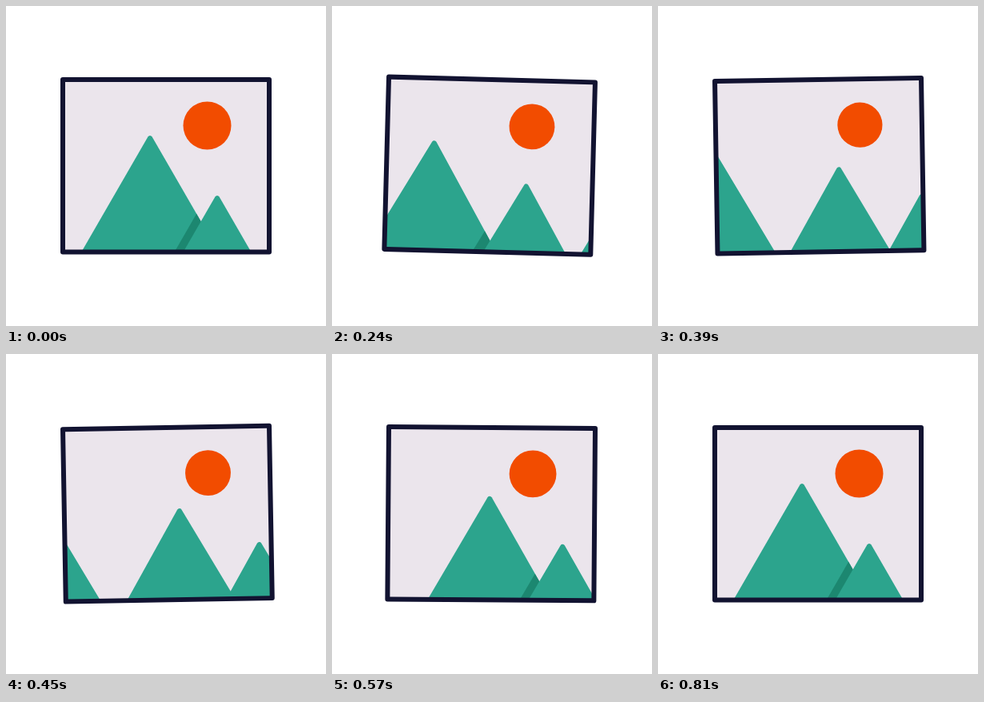
Animation of 400x400 px, one loop 2.87 s. Source, as an HTML page with a canvas:

```html
<!DOCTYPE html>
<html lang="en">
<head>
<meta charset="utf-8">
<title>Swinging picture</title>
<style>
  html, body { margin: 0; width: 100%; height: 100%; overflow: hidden; background: #fff; }
  canvas { display: block; width: 400px; height: 400px; }
</style>
</head>
<body>
<canvas id="stage" width="400" height="400"></canvas>
<script>
const ctx = document.getElementById('stage').getContext('2d');
const LOOP = 2870, STEP = 30, MOVE = 810;
const PAPER = '#ebe5ec', GREEN = '#2ca48d', SHADE = '#1c8770', INK = '#121331', SUN = '#f24c00';
const SLOPE = Math.tan(Math.PI / 6);

// Keys are [time, value] pairs.
const SWING = [[0, 0], [195, 1.8], [425, -1.1], [590, 0.5], [MOVE, 0]];
const RADIUS = [[0, 30], [345, 28], [690, 30]];

const clamp = u => Math.min(1, Math.max(0, u));
const ease = u => u * u * (3 - 2 * u);
const mix = (a, b, u) => a + (b - a) * u;

function track(keys, t) {
  for (let i = 1; i < keys.length; i++) {
    const [t0, a] = keys[i - 1], [t1, b] = keys[i];
    if (t < t1) return mix(a, b, ease((t - t0) / (t1 - t0)));
  }
  return keys[keys.length - 1][1];
}

// Mountain with a rounded peak whose visible top is at (x, y).
function mountain(x, y) {
  const path = new Path2D(), tip = y - 3, foot = 340, half = (foot - tip) * SLOPE;
  path.moveTo(x - half, foot);
  path.arcTo(x, tip, x + half, foot, 3);
  path.lineTo(x + half, foot);
  path.closePath();
  return path;
}

function fill(path, color) {
  ctx.fillStyle = color;
  ctx.fill(path);
}

function shadow(onto, x, y, offset) {
  if (offset <= 0) return;
  ctx.save();
  ctx.clip(onto);
  fill(mountain(x - offset, y), SHADE);
  ctx.restore();
}

function draw(t) {
  const p = ease(clamp(t / MOVE));
  ctx.clearRect(0, 0, 400, 400);
  ctx.save();

  // The picture hangs from the middle of its top edge.
  ctx.translate(200, 92);
  ctx.rotate(track(SWING, t) * Math.PI / 180);
  ctx.translate(-200, -92);

  const frame = new Path2D();
  frame.rect(71, 92, 258, 215.4);
  fill(frame, PAPER);

  ctx.save();
  ctx.clip(frame);
  const sun = new Path2D();
  sun.arc(251.5, 149.5, track(RADIUS, t), 0, 7);
  fill(sun, SUN);

  const leaving = mountain(mix(180, -57, p), mix(162, 200, p));
  const midX = mix(264, 180, p), midY = mix(237, 162, p);
  const middle = mountain(midX, midY);
  const newX = mix(384, 264, p);

  fill(leaving, GREEN);
  shadow(leaving, midX, midY, 11 + 13 * p);
  fill(middle, GREEN);
  shadow(middle, newX, 237, 11 * clamp((p - 0.585) / 0.2));
  fill(mountain(newX, 237), GREEN);
  ctx.restore();

  ctx.strokeStyle = INK;
  ctx.lineWidth = 6;
  ctx.lineJoin = 'round';
  ctx.stroke(frame);
  ctx.restore();
}

const start = performance.now();
function tick() {
  const t = (performance.now() - start) % LOOP;
  draw(Math.floor(t / STEP) * STEP);
  requestAnimationFrame(tick);
}
tick();
</script>
</body>
</html>
```
